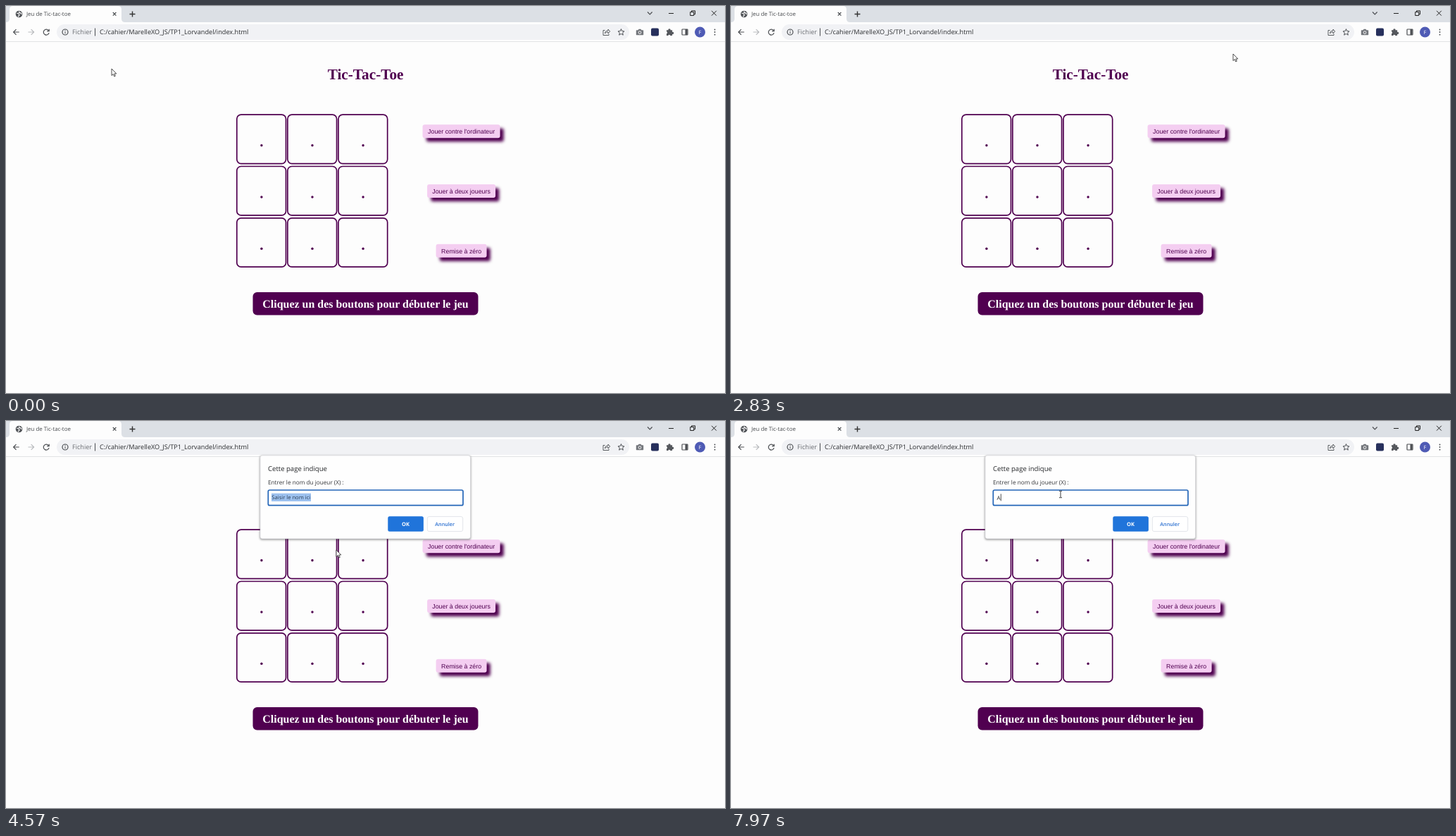
Recreate the animation shown at these times as an HTML page. Size 1021 by 549 pixels, loop 8 s.

```html
<!DOCTYPE html>
<html lang="fr">
<head>
<meta charset="utf-8">
<title>Jeu de Tic-tac-toe</title>
<style>
html, body { margin: 0; width: 100%; height: 100%; overflow: hidden; background: #fdfdfd; }
svg { display: block; font-family: "Open Sans", "Noto Sans", sans-serif; text-rendering: geometricPrecision; }
.serif { font-family: "Liberation Serif", "Times New Roman", serif; font-weight: 700; }
.arial { font-family: "Liberation Sans", Arial, sans-serif; }
.mid { text-anchor: middle; }
.line { fill: none; stroke: #4a4d51; stroke-width: 1.2; }
</style>
</head>
<body>
<svg width="1021" height="549" viewBox="0 0 1021 549">
  <defs>
    <filter id="soft" x="-20%" y="-60%" width="140%" height="220%"><feGaussianBlur stdDeviation="2.1"/></filter>
    <filter id="lift" x="-5%" y="-10%" width="110%" height="125%"><feGaussianBlur stdDeviation="1.8"/></filter>
  </defs>
  <rect width="1021" height="549" fill="#fdfdfd"/>

  <!-- Tab strip -->
  <rect width="1021" height="23" fill="#dce0e5"/>
  <path d="M0 23Q5 23 5 18V5Q5 0 10 0H159Q164 0 164 5V18Q164 23 169 23Z" fill="#fdfdfd"/>
  <circle cx="18.5" cy="11.5" r="4.8" fill="#505357"/>
  <path d="M15 10l3 1 1 2-2 2.2M19 7.5l-.5 2 3 .5.5 2" fill="none" stroke="#f4f4f4" stroke-width="1.3"/>
  <text x="29" y="14.2" font-size="7.9" fill="#45484c">Jeu de Tic-tac-toe</text>
  <g class="line">
    <path d="M151.8 9l4.6 4.6m0-4.6l-4.6 4.6"/>
    <path d="M175.5 11.5h8m-4-4v8" stroke="#333" stroke-width="1.4"/>
    <path d="M911 8.5l3.3 3.3 3.3-3.3"/>
    <path d="M941 10.5h7M971.7 8.5h5v5h-5zM973.5 8.3V6.8h5v5h-1.6M1002 6.8l6.8 6.8m0-6.8l-6.8 6.8" stroke="#222" stroke-width="1"/>
  </g>

  <!-- Toolbar -->
  <rect x="72" y="26" width="813" height="22" rx="11" fill="#f1f2f5"/>
  <path d="M0 50.5H1021" stroke="#e2e3e5"/>
  <g class="line">
    <path d="M18.7 37h-8m3.8-3.9L10.6 37l3.9 3.9"/>
    <path d="M31.5 37h8m-3.8-3.9l3.9 3.9-3.9 3.9" stroke="#b9bbbe"/>
    <path d="M60.4 34.6A4 4 0 1 0 61.1 38.2M61.2 32.7v3h-3"/>
    <circle cx="84" cy="37" r="4"/>
    <path d="M84 36.5v2.7M84 34.4v1.2M126.5 31.5v11" stroke-width="1"/>
    <path d="M850.5 34.5H848v7h8v-2M850.5 39c.3-3 2-4 4.5-4v-2l2.7 3-2.7 3v-2c-2 0-3.5.5-4.5 2z" stroke-width=".9"/>
    <path d="M873.5 32.6l1.3 3 3.2.3-2.4 2.1.7 3.2-2.8-1.7-2.8 1.7.7-3.2-2.4-2.1 3.2-.3z" stroke-width="1"/>
    <rect x="960" y="33" width="8" height="8" rx=".7"/>
    <path d="M966 33v8" stroke-width="3"/>
  </g>
  <path d="M895.5 34.3h2l1-1.6h3l1 1.6h2q.7 0 .7.7v5.5q0 .7-.7.7h-9q-.7 0-.7-.7V35q0-.7.7-.7z" fill="#74777c"/>
  <circle cx="900" cy="37.6" r="1.9" fill="#74777c" stroke="#f4f4f4"/>
  <rect x="916" y="31.5" width="11" height="11" rx="2" fill="#27305c"/>
  <path d="M938 34.3h2.5a1.6 1.6 0 1 1 3 0h2.6v2.6a1.6 1.6 0 1 1 0 3v2h-2.8a1.6 1.6 0 0 0-3 0H938v-2.6a1.6 1.6 0 0 0 0-3z" fill="#55585d"/>
  <circle cx="985.5" cy="37" r="7.5" fill="#4f5bb5"/>
  <text class="mid" x="985.5" y="39.7" font-size="7.3" fill="#fff">F</text>
  <path d="M1006.5 33.4v.1m0 3.5v.1m0 3.5v.1" stroke="#45484c" stroke-width="1.8" stroke-linecap="round"/>
  <text x="94" y="40.4" font-size="9.1" fill="#6a6d72">Fichier</text>
  <text x="133" y="40.4" font-size="9.17" fill="#2b2d30">C:/cahier/MarelleXO_JS/TP1_Lorvandel/index.html</text>

  <!-- Page -->
  <text class="serif mid" x="510.6" y="104" font-size="21.27" fill="#500050">Tic-Tac-Toe</text>
  <g id="grid"></g>
  <g id="buttons"></g>
  <rect x="350.5" y="406" width="320" height="32.5" rx="6" fill="#500050"/>
  <text class="serif mid" x="510.5" y="427.6" font-size="15.96" fill="#fff">Cliquez un des boutons pour débuter le jeu</text>

  <!-- Prompt -->
  <g id="prompt">
    <rect x="360.5" y="49.5" width="299.5" height="119" rx="3" fill="#000" opacity=".42" filter="url(#lift)"/>
    <rect x="361" y="49" width="298.5" height="118" rx="3" fill="#fefefe" stroke="#d5d6da" stroke-width=".6"/>
    <text x="372" y="70.8" font-size="9.57" fill="#25272a">Cette page indique</text>
    <text x="372" y="89.6" font-size="8.22" fill="#34363a">Entrer le nom du joueur (X) :</text>
    <rect x="372.3" y="98" width="276.7" height="21.7" rx="2" fill="#fff" stroke="#2466b8" stroke-width="1.7"/>
    <g id="hint">
      <rect x="377" y="102.6" width="56" height="11.4" fill="#9dc1ef"/>
      <text x="377.3" y="111.2" font-size="7.62" fill="#2c3e55">Saisir le nom ici</text>
    </g>
    <g id="typed">
      <text x="377.5" y="111.6" font-size="8" fill="#25272a">A</text>
      <path d="M383.3 103.4v10" stroke="#222" stroke-width=".8"/>
    </g>
    <rect x="542.3" y="135.3" width="50.6" height="21.5" rx="2.5" fill="#2074da"/>
    <text class="mid" x="567.4" y="148.8" font-size="7.5" font-weight="700" fill="#fff">OK</text>
    <rect x="598.3" y="135.6" width="50.4" height="21" rx="2.5" fill="#fff" stroke="#dfe2e8" stroke-width=".9"/>
    <text class="mid" x="623.2" y="148.8" font-size="7.2" font-weight="600" fill="#2a6fd0">Annuler</text>
  </g>

  <path id="arrow" d="M0 0V9.6L2.2 7.6 3.8 11 5.3 10.3 3.8 7H6.8Z" fill="#fff" stroke="#222" stroke-width=".8"/>
  <path id="beam" d="M-2 -4.7H-.5L0-4.3.5-4.7H2M0-4.3V4.3M-2 4.7H-.5L0 4.3.5 4.7H2" fill="none" stroke="#222" stroke-width=".9"/>
</svg>
<script>
const LOOP = 8000, OPEN = 3970, FADE = 170, TYPE = 7800;
const $ = id => document.getElementById(id);

let cells = '';
for (let i = 0; i < 9; i++) {
  const x = 327.8 + i % 3 * 72.1, y = 154.2 + Math.floor(i / 3) * 73.3;
  cells += `<rect x="${x}" y="${y}" width="69.7" height="69.4" rx="6" fill="none" stroke="#500050" stroke-width="1.7"/>
    <circle cx="${x + 35.1}" cy="${y + 43.5}" r="1.7" fill="#500050"/>`;
}
$('grid').innerHTML = cells;

const button = (label, y, w) => {
  const x = 646.6 - w / 2;
  return `<rect x="${x + 5.2}" y="${y + 5.2}" width="${w}" height="19" rx="3" fill="#500050" filter="url(#soft)"/>
    <rect x="${x}" y="${y}" width="${w}" height="19" rx="3" fill="#f4cef1"/>
    <text class="arial mid" x="646.6" y="${y + 12.8}" font-size="8.86" fill="#500050">${label}</text>`;
};
$('buttons').innerHTML = button("Jouer contre l'ordinateur", 168.2, 110)
  + button('Jouer à deux joueurs', 253, 97) + button('Remise à zéro', 337.8, 72);

// Pointer stops: time, x, y
const stops = [
  [0, 150, 89], [700, 440, 440], [1560, 698, 275], [2830, 713, 68],
  [3750, 650, 262], [4150, 650, 262], [4570, 469, 183], [4950, 468, 104], [LOOP, 468, 104]
];

function pointer(t) {
  const i = stops.findIndex(s => s[0] > t);
  const [t0, x0, y0] = stops[i - 1], [t1, x1, y1] = stops[i];
  const u = (t - t0) / (t1 - t0), k = u * u * (3 - 2 * u);
  return [x0 + (x1 - x0) * k, y0 + (y1 - y0) * k];
}

const show = (id, on) => $(id).style.display = on ? '' : 'none';

function draw(now) {
  const t = now % LOOP;
  const k = Math.min(1, Math.max(0, (t - OPEN) / FADE)), rest = (1 - k) ** 2;
  $('prompt').setAttribute('opacity', k);
  $('prompt').setAttribute('transform',
    `translate(510.5 ${108 - 13.5 * rest}) scale(${1 + .015 * rest}) translate(-510.5 -108)`);
  show('hint', t < TYPE);
  show('typed', t >= TYPE);

  const [x, y] = pointer(t), inField = t > OPEN + FADE && y < 120;
  show('arrow', !inField);
  show('beam', inField);
  $(inField ? 'beam' : 'arrow').setAttribute('transform', `translate(${x} ${y})`);
  requestAnimationFrame(draw);
}
draw(performance.now());
</script>
</body>
</html>
```
